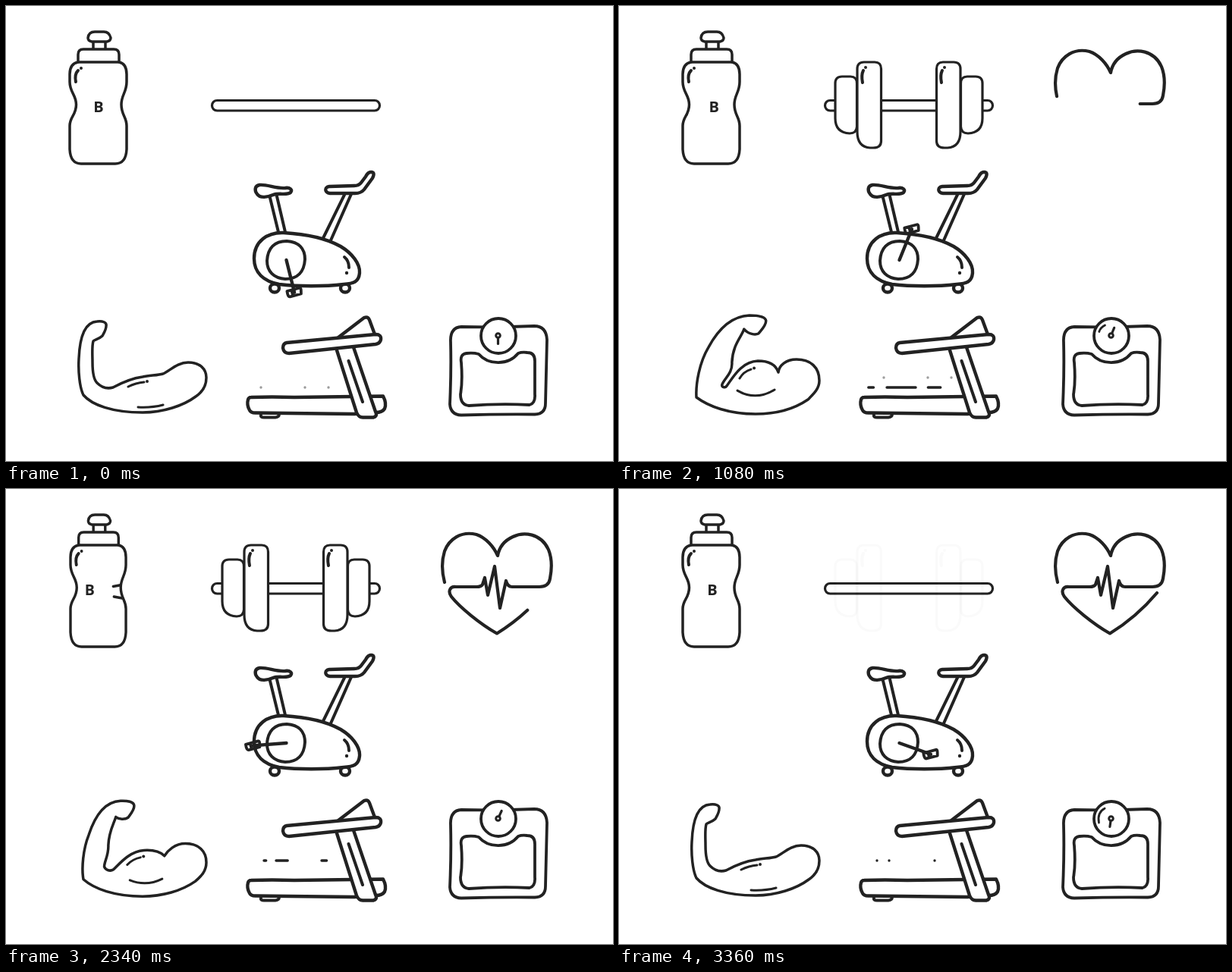
These frames come from a looping animation (800x600 px, 3.39 s). An HTML page:

```html
<!DOCTYPE html>
<html lang="en">
<head>
<meta charset="utf-8">
<title>Fitness icons</title>
<style>
html, body { margin: 0; width: 100%; height: 100%; overflow: hidden; background: #fff; }
svg { display: block; width: 800px; height: 600px; fill: none; stroke: #222; stroke-width: 3.5; stroke-linecap: round; stroke-linejoin: round; }
.dot { fill: #222; stroke: none; }
.solid { fill: #fff; }
.bold { stroke-width: 4.4; }
text { font: 700 20px "Noto Sans", "Open Sans", sans-serif; fill: #222; stroke: none; text-anchor: middle; }
</style>
</head>
<body>
<svg viewBox="0 0 800 600">
  <defs>
    <path id="shell" d="M95 74H149Q159 76 159 90V100C159 114 152 117 152 130C152 144 159 146 159 158V189Q158 208 144 208H99Q85 208 84 189V158C84 146 92.500 144 92.500 130C92.500 117 84 114 84 100V90Q84 76 95 74Z"/>
    <clipPath id="inside"><use href="#shell"/></clipPath>
    <path id="big" d="M323 74H337Q345.500 74 345.500 83V178Q345.500 187 335 187H331Q314 186 314 166V83Q314 74 323 74Z"/>
    <path id="small" d="M294 93H305Q313.500 93 313.500 102V159Q313 168 304 168Q285 167 285 148V102Q285 93 294 93Z"/>
    <g id="shine"><path d="M321 101Q319 91 322 85" stroke-width="4"/><circle class="dot" cx="325" cy="81" r="2"/></g>
  </defs>

  <g id="bottle">
    <path d="M113 47Q108 46 108 42Q109 34 117 34H129Q136 34 138 42Q138 46 133 47ZM115 47V56M131 47V56"/>
    <path d="M95 74V64Q95 57 102 57H142Q149 57 149 64V74"/>
    <g clip-path="url(#inside)">
      <g id="label">
        <text x="0" y="140">B</text>
        <path d="M32 128.500L43 126.500M33 142L44 144M-43 126.500L-33 128M-47 144L-36 143"/>
      </g>
    </g>
    <use href="#shell"/>
    <path d="M92 100Q90 90 95 85" stroke-width="4"/>
    <circle class="dot" cx="99" cy="82" r="2"/>
  </g>

  <g id="dumbbell" stroke-width="3.2">
    <rect x="271.500" y="124.500" width="221" height="13.500" rx="6.700"/>
    <g id="smallL"><use href="#small" class="solid"/></g>
    <g id="smallR"><use href="#small" class="solid" transform="matrix(-1 0 0 1 764 0)"/></g>
    <g id="bigL"><use href="#big" class="solid"/><use href="#shine"/></g>
    <g id="bigR"><use href="#big" class="solid" transform="matrix(-1 0 0 1 764 0)"/><use href="#shine" x="104"/></g>
  </g>

  <path id="heart" pathLength="1" stroke-width="4.200" d="M709 137Q682 169 647 190.500C625 178 598 156 587 142C582 135 585 128 593 129H620Q626 129 628 126L631 117L635 140L644 102L651 157L659 121Q661 129 667 129H703C712 129 716 125 717 118C720 103 719 90 715 80C705 58 682 56 668 63C657 68 650 77 648 88C643 76 632 64 620 60C600 55 584 66 578 82C574 95 574 108 578 123"/>

  <g class="bold">
    <path d="M348 253L359 298M357 251L368 298M446 249L418 306M455 248L428 309" stroke-width="4"/>
    <ellipse cx="354" cy="372" rx="6" ry="5.500"/><ellipse cx="447" cy="372" rx="6" ry="5.500"/>
    <path class="solid" d="M327 333C327 310 345 298 366 299C400 301 425 308 441 317C456 326 467 340 466 352C465 364 458 366 445 367C420 370 385 370 360 367C340 363 327 352 327 333Z"/>
    <path d="M344 336C345 319 354 310 370 310C386 311 394 320 394 334C393 351 384 360 368 360C353 359 344 350 344 336Z" stroke-width="4"/>
    <path d="M446 331Q452 336 452 345" stroke-width="4"/><circle class="dot" cx="449" cy="352" r="2.200"/>
    <path class="solid" d="M334 236C328 237 327 243 331 248C335 254 345 252 352 249C360 246 370 250 375 246C378 242 374 239 368 240C355 241 345 235 334 236Z"/>
    <path class="solid" d="M426 238C419 239 420 246 427 247L460 247Q468 247 472 242L483 227Q487 219 481 219Q477 219 474 225L468 233Q465 237 459 237Z"/>
    <path id="crank"/>
    <path id="pedal" d="M-9-4H8Q10-4 9 0L8 4H-7Q-10 4-9-4ZM-3-3V3" stroke-width="3.800"/>
  </g>

  <g id="arm">
    <path id="outline"/>
    <path id="curves" stroke-width="3"/>
    <circle id="spot" class="dot" r="2"/>
  </g>

  <g class="bold">
    <g id="dashes" stroke-width="3.400"></g>
    <path d="M323 516Q350 515 380 516L497 514.500Q502 524 499 531Q496 536 487 536L459 538L330 536.500Q323 537 321 533Q317 526 319 519Q320 516 323 516Z"/>
    <path d="M336 539Q335 543 341 542.500H355Q360 542 360 538" stroke-width="4"/>
    <path class="solid" d="M436 454L462 536Q465 543 471 542.500H484Q490 541 487 535L458 450"/>
    <path d="M451.500 468L470 522" stroke-width="4"/>
    <path class="solid" d="M438 437L472 411Q477 409 479 414L486 433"/>
    <path class="solid" d="M370 444L487 433Q495 433 494 440Q493 445 487 446L373 458Q366 458 365 451Q365 445 370 444Z"/>
  </g>

  <g stroke-width="3.800">
    <path d="M600 423Q585 424 586 443Q587 480 585 525Q586 539 600 539.500Q650 538 697 538.500Q711 538 711 524L713 440Q712 422 696 422Q650 424 600 423Z"/>
    <path d="M607 458Q598 459 600 470Q602 495 599 512Q599 526 610 527Q650 524 690 526Q698 524 697 512V468Q697 457 687 457Q680 456 675 458C662 474 636 474 623 459Q616 457 607 458Z"/>
    <circle class="solid" cx="649" cy="435" r="23"/>
    <path id="gleam" pathLength="1" d="M632.500 440Q630 426 640.500 421" stroke-width="2.800"/>
    <circle cx="648.500" cy="434.500" r="2.800" stroke-width="3"/>
    <path id="needle" d="M648.500 431V423.500" stroke-width="3.200"/>
  </g>
</svg>
<script>
const LOOP = 3390, STEP = 30, BEAT = LOOP / 4, SWAY = LOOP / 6;
const $ = id => document.getElementById(id);
const set = (el, attrs) => { for (const k in attrs) el.setAttribute(k, attrs[k]); };
const clamp = x => Math.min(1, Math.max(0, x));
const ease = (t, a, b) => { const x = clamp((t - a) / (b - a)); return x * x * (3 - 2 * x); };
const mix = (a, b, p) => a + (b - a) * p;
const blend = (a, b, p) => a.map((v, i) => mix(v, b[i], p).toFixed(2));

function trim(el, s, e, show = true) {
  set(el, {
    'stroke-dasharray': `${Math.max(e - s, .0005)} 3`,
    'stroke-dashoffset': -s,
    visibility: show ? 'visible' : 'hidden'
  });
}

// Start point, then cubic segments
const RELAXED = [102,513, 97,503,95,482,96,465, 97,440,103,417,120,416, 127,415,133,417,132,422, 132,427,128,433,127,435,
  123,439,116,440,115,442, 113,449,114,460,114,470, 114,482,115,492,120,497, 126,503,134,505,141,503,
  152,497,166,491,180,489, 190,487,200,487,207,485, 216,481,226,470,240,470, 256,470,264,479,264,490,
  264,502,259,509,250,515, 234,527,207,536,180,536, 140,536,113,526,102,513];
const FLEXED = [102,516, 101,498,106,470,118,450, 130,428,148,409,172,408, 182,408,193,409,194,415, 194,422,187,428,184,432,
  180,434,171,433,165,426, 162,436,150,446,149,470, 150,484,139,491,136,499, 135,503,140,504,142,501,
  150,490,161,469,183,468, 198,468,207,474,210,483, 211,474,220,466,234,466, 253,466,264,477,264,494,
  264,505,256,512,249,519, 230,532,205,538,180,538, 145,538,118,528,102,516];
const FOLDS = [[161,502, 171,497,182,496, 174,529, 192,530,207,526], [159,491, 164,482,174,479, 156,507, 180,521,205,506]];

// Right end and length of each dash, per row
const rows = [[503, 0, 0], [490, 13, 233]].map(([y, shift, delay]) => ({
  y, delay,
  lines: [[336, 9], [394, 51], [425, 22]].map(([x, len]) => {
    const el = document.createElementNS('http://www.w3.org/2000/svg', 'path');
    $('dashes').append(el);
    return { el, x: x + shift, len };
  })
}));

function bottle(t) {
  const u = t % SWAY;
  const x = 122 - 20 * ease(u, 0, 140) + 40 * ease(u, 140, 400) - 20 * ease(u, 400, 555);
  const squeeze = 1 - .026 * (ease(u, 0, 75) - ease(u, 200, 380));
  set($('label'), { transform: `translate(${x} 0)` });
  set($('bottle'), { transform: `translate(122 0) scale(${squeeze} 1) translate(-122 0)` });
}

function dumbbell(t) {
  const gone = ease(t, 3180, 3375);
  const plate = (name, start, gap) => {
    const off = gap * (1 - ease(t, start, start + 320));
    const opacity = ease(t, start, start + 300) * (1 - gone);
    set($(name + 'L'), { transform: `translate(${-off} 0)`, opacity });
    set($(name + 'R'), { transform: `translate(${off} 0)`, opacity });
  };
  plate('big', 200, 28);
  plate('small', 505, 28);
  const lift = 10 * Math.sin(Math.PI * clamp((t - 1700) / 500)) ** 2;
  set($('dumbbell'), { transform: `translate(0 ${-lift})` });
}

function heart(t) {
  const first = t < 1770, u = t - (first ? 640 : 1770);
  let end = ease(u, 0, 460);
  if (first) end *= 1 - ease(t, 1350, 1740);
  const start = .6 * (ease(u, 120, 410) - ease(u, 420, 600));
  trim($('heart'), start, end, u >= 0 && !(first && t > 1740));
}

function bike(t) {
  const a = (76 + 360 * Math.min(1, t % 1842 / 1800)) * Math.PI / 180;
  const x = 369.5 + 44 * Math.cos(a), y = 335 + 44 * Math.sin(a);
  set($('crank'), { d: `M369.500 335L${x} ${y}` });
  set($('pedal'), { transform: `translate(${x} ${y}) rotate(-15)` });
}

function arm(u) {
  const p = ease(u, 40, 240) - ease(u, 587, 720);
  const pts = blend(RELAXED, FLEXED, p), f = blend(...FOLDS, p);
  set($('outline'), { d: `M${pts.slice(0, 2)}C${pts.slice(2)}Z` });
  set($('curves'), { d: `M${f.slice(0, 2)}Q${f.slice(2, 6)}M${f.slice(6, 8)}Q${f.slice(8)}` });
  set($('spot'), { cx: mix(186, 178, p), cy: mix(495, 477.5, p) });
}

function treadmill(u) {
  for (const { y, delay, lines } of rows) {
    const v = u - delay, grow = ease(v, 0, 325), shrink = ease(v, 179, 544);
    for (const { el, x, len } of lines) set(el, {
      d: `M${x - len * grow} ${y}L${x - len * shrink + .01} ${y}`,
      opacity: v < -3 || v > 600 ? 0 : clamp(.45 + v / 70)
    });
  }
}

function scale(u) {
  const turn = -180 + 205 * (ease(u, 0, 250) - ease(u, 690, 835));
  set($('needle'), { transform: `rotate(${turn} 648.500 434.500)` });
  if (u < 500) trim($('gleam'), ease(u, 170, 300), ease(u, 85, 215), u > 85 && u < 300);
  else trim($('gleam'), 1 - ease(u, 685, 810), 1 - ease(u, 815, 847), u > 685);
}

function draw(now) {
  const t = Math.floor(now % LOOP / STEP) * STEP, beat = t % BEAT;
  for (const part of [bottle, dumbbell, heart, bike]) part(t);
  for (const part of [arm, treadmill, scale]) part(beat);
}

const began = performance.now();
function tick() {
  draw(performance.now() - began);
  requestAnimationFrame(tick);
}
tick();
</script>
</body>
</html>
```
